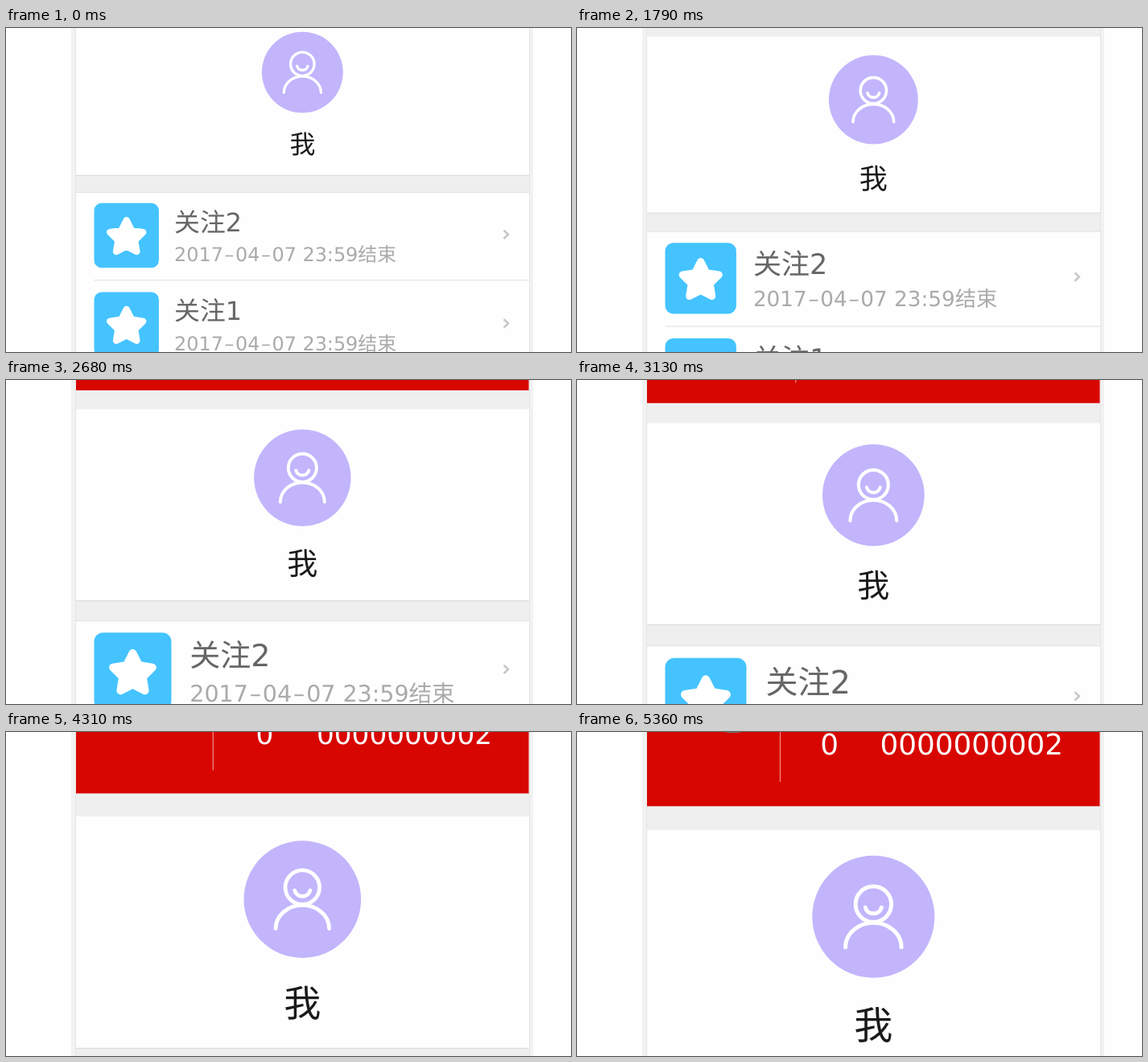
These frames come from a looping animation (702 by 403 pixels, 6920 ms). An HTML page:

```html
<!DOCTYPE html>
<html lang="zh-CN">
<head>
<meta charset="utf-8">
<title>Responsive list zoom</title>
<style>
  html, body { margin: 0; width: 100%; height: 100%; overflow: hidden; background: #fefefe; }
  svg { display: block; width: 100vw; height: 100vh; }
  text { font-family: "DejaVu Sans", "Noto Sans CJK SC", "Noto Sans CJK", sans-serif; text-rendering: geometricPrecision; }
  .line { fill: none; stroke: #fff; stroke-width: 5; stroke-linecap: round; }
</style>
</head>
<body>
<svg viewBox="0 0 702 403">
  <defs>
    <g id="badge">
      <rect width="121.2" height="121.2" rx="14" fill="#44c3ff"/>
      <path id="star" fill="#fff" stroke="#fff" stroke-width="12.5" stroke-linejoin="round"/>
    </g>
  </defs>

  <rect x="81" width="574" height="403" fill="#f2f2f2"/>
  <rect x="87" width="563" height="403" fill="#efefef"/>

  <g id="banner">
    <rect id="red" x="87" width="562.5" fill="#d80600"/>
    <circle id="photo" cx="194" fill="#5f8578"/>
    <path id="divider" stroke="#ef8a80" stroke-width="1.3"/>
    <text id="count" text-anchor="middle" fill="#fff">0</text>
    <text id="serial" x="604" text-anchor="end" fill="#fff">0000000002</text>
  </g>

  <rect id="card" x="87" width="563" fill="#fefefe"/>
  <path id="cardEdge" stroke="#d9d9d9"/>
  <g id="profile">
    <circle r="76" fill="#c2b5fc"/>
    <circle class="line" cy="-15.5" r="22.2"/>
    <path class="line" d="M-10-11.5a10.2 9.5 0 0 0 20 0"/>
    <path class="line" d="M-34.7 38a34.7 30.5 0 0 1 69.4 0"/>
  </g>
  <text id="name" x="368.3" text-anchor="middle" fill="#1a1a1a">我</text>

  <rect id="list" x="87" width="563" height="403" fill="#fefefe"/>
  <path id="listEdge" stroke="#e2e2e2"/>
  <path id="separator" stroke="#dedede"/>
  <g id="rows"></g>
  <path d="M86.5 0V403M650.5 0V403" stroke="#e6e6e6"/>
</svg>

<script>
const LOOP = 6920;
// [start in ms, root font size]
const STEPS = [
  [0, 31.85], [1050, 32.95], [1340, 34], [1790, 35], [2240, 36], [2680, 38], [2980, 39],
  [3130, 40], [3430, 42], [3870, 44], [4170, 45], [4310, 46], [4610, 47], [5360, 48]
];
const BASE = 48;

const $ = id => document.getElementById(id);
const set = (target, attrs) => {
  const el = typeof target === 'string' ? $(target) : target;
  for (const key in attrs) el.setAttribute(key, attrs[key]);
};
const place = (x, y, scale) => `translate(${x} ${y}) scale(${scale})`;

function starPath(cx, cy, outer, inner) {
  const points = Array.from({ length: 10 }, (_, i) => {
    const r = i % 2 ? inner : outer, a = i * Math.PI / 5;
    return `${cx + r * Math.sin(a)} ${cy - r * Math.cos(a)}`;
  });
  return `M${points.join('L')}Z`;
}

const row = title => `<g>
  <g class="body">
    <use href="#badge"/>
    <text x="150" y="52.8" font-size="48" fill="#666">${title}</text>
    <text x="150" y="108.7" font-size="36" fill="#aaa"
      dx="0 0 0 0 2.4 2.4 0 2.4 2.4">2017–04–07 23:59结束</text>
  </g>
  <path class="chevron" d="M-2.8-5.2l5.4 5.2-5.4 5.2" fill="none" stroke="#c8c8c8" stroke-width="2.6"/>
</g>`;

set('star', { d: starPath(60.6, 64.7, 32.5, 16.5) });
$('rows').innerHTML = row('关注2') + row('关注1');

function draw(u) {
  const scale = u / BASE;
  const redBottom = 7.95 * u - 289.3;
  const cardTop = redBottom + 0.62 * u;
  const cardBottom = cardTop + 6.27 * u;
  const listTop = cardBottom + 0.66 * u;
  const rowTop = listTop + 7 + 0.2 * u;
  const side = 2.525 * u;
  const digits = 0.745 * u;
  const dividerX = 252.5 + 2.4 * (BASE - u);
  const baseline = redBottom - 1.33 * u;

  set('red', { height: Math.max(0, redBottom) });
  set('photo', { cy: redBottom - 3.25 * u, r: 1.35 * u });
  set('divider', { d: `M${dividerX} -200V${redBottom - 0.63 * u}` });
  set('count', { x: 313.5 + 4 * (BASE - u), y: baseline, 'font-size': digits });
  set('serial', { y: baseline, 'font-size': digits });

  set('card', { y: cardTop, height: cardBottom - cardTop });
  set('cardEdge', { d: `M87 ${cardBottom}H650` });
  set('profile', { transform: place(368.3, cardTop + 2.243 * u, scale) });
  set('name', { y: cardTop + 5.42 * u, 'font-size': u });

  set('list', { y: listTop });
  set('listEdge', { d: `M87 ${listTop}H650` });
  set('separator', { d: `M109.5 ${rowTop + side + 15.5}H650` });
  [...$('rows').children].forEach((el, i) => {
    const top = rowTop + i * (side + 30.3);
    set(el.querySelector('.body'), { transform: place(109.5, top, scale) });
    set(el.querySelector('.chevron'), { transform: place(621.3, top + 5.6 + 1.05 * u, 1) });
  });
}

let current;
function tick(now) {
  const t = now % LOOP;
  const size = STEPS.findLast(([start]) => start <= t)[1];
  if (size !== current) draw(current = size);
  requestAnimationFrame(tick);
}
draw(current = STEPS[0][1]);
requestAnimationFrame(tick);
</script>
</body>
</html>
```
